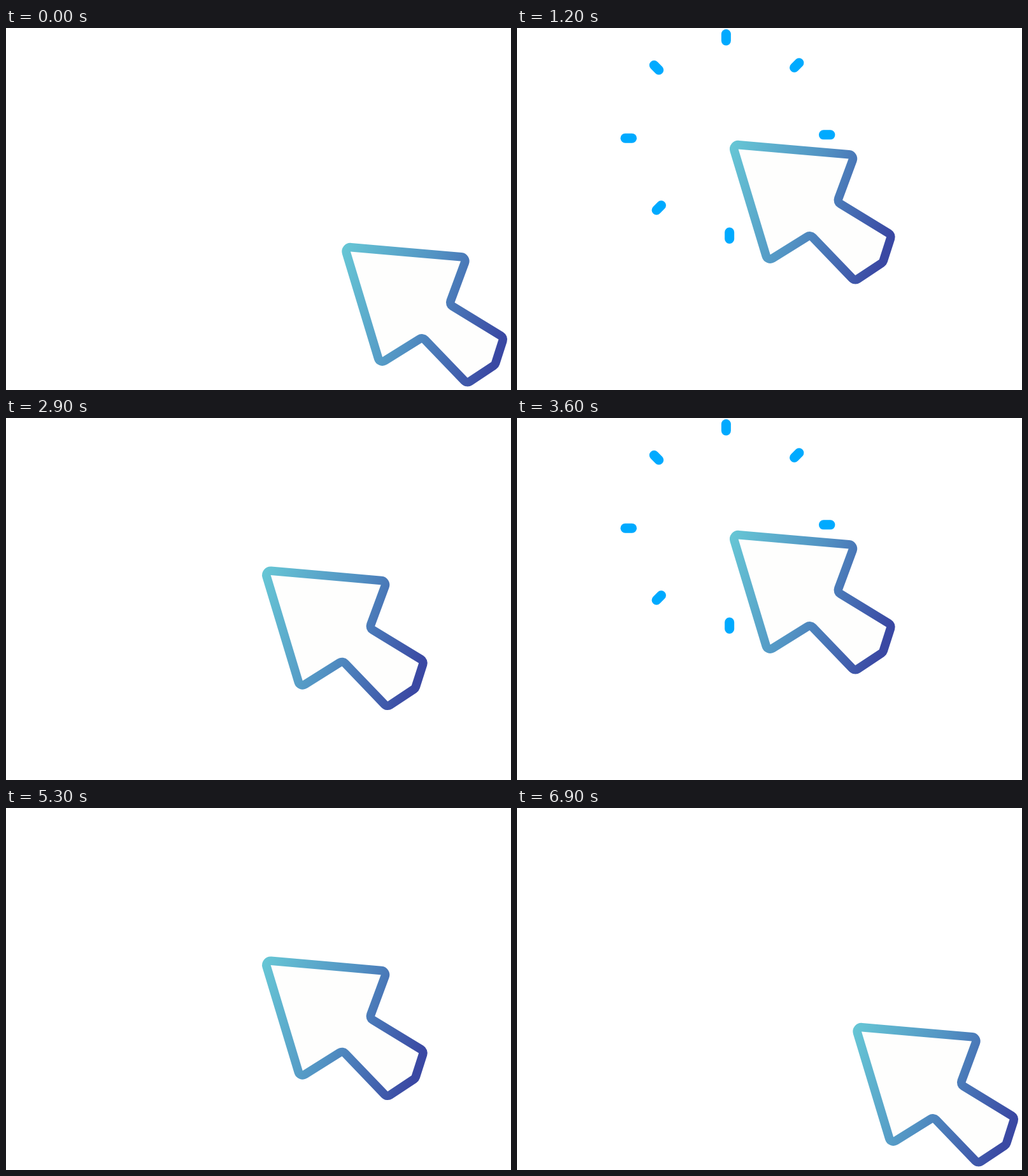
Animation of 793x569 px, one loop 7210 ms. Source, as an HTML page with a canvas:

```html
<!DOCTYPE html>
<html lang="en">
<head>
<meta charset="utf-8">
<title>Click</title>
<style>
  html, body { margin: 0; width: 100%; height: 100%; overflow: hidden; background: #fff; }
  canvas { display: block; }
</style>
</head>
<body>
<canvas id="stage" width="793" height="569"></canvas>
<script>
const ctx = document.getElementById('stage').getContext('2d');

const LOOP = 7210, STEP = 80, CYCLE = 30, CYCLES = 3;
const TRAVEL = { x: -193.4, y: -161 };
const BURST = { x: 331, y: 170.5, inner: 60, outer: 161, tilt: -0.017 };
const BAND = 13.6;

// Centre line of the outline, clockwise from the tip
const corners = [
  [531.6, 343.8], [723.5, 360.5], [696.2, 434.4], [781.6, 486.5], [767.9, 529.3],
  [723.7, 558.6], [654, 486], [587.2, 527.8]
];

function roundedPath(points, radius) {
  const path = new Path2D();
  const [first, second] = points;
  path.moveTo((first[0] + second[0]) / 2, (first[1] + second[1]) / 2);
  for (let i = 1; i <= points.length; i++) {
    const a = points[i % points.length];
    const b = points[(i + 1) % points.length];
    path.arcTo(a[0], a[1], b[0], b[1], radius);
  }
  path.closePath();
  return path;
}

const arrow = roundedPath(corners, BAND / 2);
const blue = ctx.createLinearGradient(530, 343, 797.3, 436.5);
blue.addColorStop(0, '#66c6d5');
blue.addColorStop(0.5, '#5292c3');
blue.addColorStop(1, '#3a48a3');

// Eased progress from 0 to 1 between two steps
function ease(step, from, to) {
  const t = Math.min(1, Math.max(0, (step - from) / (to - from)));
  return t * t * (3 - 2 * t);
}

function drawBurst(step) {
  const head = ease(step, 10, 15);
  const tail = ease(step, 11, 16);
  if (head <= tail) return;
  const radius = p => BURST.inner + (BURST.outer - BURST.inner) * p;
  const middle = radius((head + tail) / 2);
  const half = (radius(head) - radius(tail)) / 2;
  ctx.strokeStyle = '#00aaff';
  ctx.lineWidth = 15;
  ctx.lineCap = 'round';
  for (let i = 0; i < 8; i++) {
    const angle = i * Math.PI / 4;
    const x = BURST.x + middle * Math.cos(angle + BURST.tilt);
    const y = BURST.y + middle * Math.sin(angle + BURST.tilt);
    const dx = half * Math.cos(angle), dy = half * Math.sin(angle);
    ctx.beginPath();
    ctx.moveTo(x - dx, y - dy);
    ctx.lineTo(x + dx, y + dy);
    ctx.stroke();
  }
}

function drawArrow(step) {
  const p = ease(step, 0, 10) - ease(step, 16, 26);
  ctx.save();
  ctx.translate(TRAVEL.x * p, TRAVEL.y * p);
  ctx.fillStyle = '#fefefd';
  ctx.fill(arrow);
  ctx.strokeStyle = blue;
  ctx.lineWidth = BAND;
  ctx.lineJoin = 'round';
  ctx.stroke(arrow);
  ctx.restore();
}

function render() {
  const time = performance.now() % LOOP;
  const step = Math.min(Math.floor(time / STEP), CYCLE * CYCLES - 1) % CYCLE;
  ctx.fillStyle = '#fff';
  ctx.fillRect(0, 0, 793, 569);
  drawBurst(step);
  drawArrow(step);
  requestAnimationFrame(render);
}
render();
</script>
</body>
</html>
```
